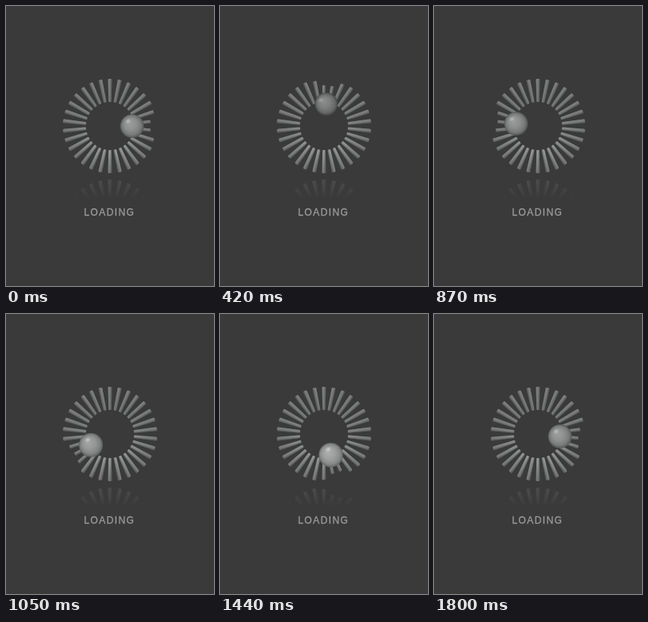
An HTML page with a canvas for the animation above (1.83 s loop, 260 px wide and 350 px high).

```html
<!DOCTYPE html>
<html lang="en">
<head>
<meta charset="utf-8">
<title>Loading</title>
<style>
  html, body { margin: 0; width: 100%; height: 100%; overflow: hidden; background: #3a3a3a; }
  canvas { display: block; width: 260px; height: 350px; }
</style>
</head>
<body>
<canvas id="stage" width="260" height="350"></canvas>
<script>
const ctx = document.getElementById('stage').getContext('2d');
const CX = 130, CY = 150, SPOKES = 30, ORBIT = 27.6;
const STEP = 30, FRAMES = 61, HOLD = 54, FLOOR = 213;
const rad = deg => deg * Math.PI / 180;
const gray = v => `rgb(${v - 1 | 0},${v + 1 | 0},${v | 0})`;

function gradient(g, stops) {
  for (const [at, color] of stops) g.addColorStop(at, color);
  return g;
}

function spokePath(inner, outer, a, b) {
  ctx.beginPath();
  ctx.moveTo(inner + 1.2, -a);
  ctx.lineTo(outer - 1.2, -b);
  ctx.quadraticCurveTo(outer, -b, outer, -b + 1.2);
  ctx.lineTo(outer, b - 1.2);
  ctx.quadraticCurveTo(outer, b, outer - 1.2, b);
  ctx.lineTo(inner + 1.2, a);
  ctx.quadraticCurveTo(inner, a, inner, a - 1);
  ctx.lineTo(inner, 1 - a);
  ctx.quadraticCurveTo(inner, -a, inner + 1.2, -a);
  ctx.closePath();
}

// Spokes close to the ball sink away from the viewer.
function spoke(deg, ballDeg) {
  const gap = Math.abs((deg - ballDeg + 540) % 360 - 180);
  const sink = Math.exp(-Math.pow(gap / 16, 4));
  const low = -Math.sin(rad(deg));
  const side = Math.cos(rad(deg)) < 0 ? -1 : 1;
  const k = 1 - 0.14 * sink;
  ctx.save();
  ctx.translate(CX, CY);
  ctx.rotate(-rad(deg));
  ctx.scale(k, k);
  spokePath(30, 59, 1.8, 2.4);
  ctx.fillStyle = gradient(ctx.createLinearGradient(30, 0, 59, 0), [
    [0, gray(134 + 20 * low)],
    [0.5, gray(126 + 7 * low)],
    [1, gray(119 - 5 * low)]
  ]);
  ctx.fill();
  ctx.clip();
  const edge = gradient(ctx.createLinearGradient(0, -2.4 * side, 0, 2.4 * side), [
    [0, 'rgba(195,198,196,.2)'],
    [0.45, 'rgba(120,122,121,0)'],
    [0.6, 'rgba(60,62,61,.1)'],
    [1, 'rgba(45,47,46,.6)']
  ]);
  ctx.fillStyle = edge;
  ctx.fillRect(29, -4, 32, 8);
  ctx.restore();
}

function ball(deg) {
  const x = CX + ORBIT * Math.cos(rad(deg));
  const y = CY - ORBIT * Math.sin(rad(deg));
  const low = (y - CY) / ORBIT;
  const r = 14.8 + 0.4 * low;
  const v = 139 + 17 * low;
  ctx.beginPath();
  ctx.arc(x, y, r, 0, 7);
  ctx.fillStyle = gradient(ctx.createRadialGradient(x - 4, y - 4, 1, x, y, r), [
    [0, gray(v + 18)],
    [0.45, gray(v + 4)],
    [0.8, gray(v - 18)],
    [1, gray(v - 54)]
  ]);
  ctx.fill();
  const hx = x - 5 + 2 * low, hy = y - 6 - low;
  ctx.beginPath();
  ctx.ellipse(hx, hy, 4.5, 2.4, -0.5, 0, 7);
  ctx.fillStyle = gradient(ctx.createRadialGradient(hx, hy, 0, hx, hy, 4.5), [
    [0, `rgba(225,228,226,${0.5 + 0.2 * low})`],
    [1, 'rgba(200,203,201,0)']
  ]);
  ctx.fill();
}

function scene(deg) {
  for (let i = 0; i < SPOKES; i++) spoke(6 + i * 360 / SPOKES, deg);
  ball(deg);
}

function reflection(deg) {
  ctx.save();
  ctx.beginPath();
  ctx.rect(0, FLOOR, 260, 32);
  ctx.clip();
  ctx.save();
  ctx.translate(0, 2 * FLOOR);
  ctx.scale(1, -1);
  scene(deg);
  ctx.restore();
  ctx.fillStyle = gradient(ctx.createLinearGradient(0, FLOOR + 3, 0, 240), [
    [0, 'rgba(58,58,58,.68)'],
    [0.5, 'rgba(58,58,58,.84)'],
    [1, 'rgba(58,58,58,1)']
  ]);
  ctx.fillRect(0, FLOOR, 260, 32);
  ctx.restore();
}

function label() {
  ctx.font = '12px "Liberation Sans", Arial, sans-serif';
  ctx.letterSpacing = '1.4px';
  ctx.fillStyle = ctx.strokeStyle = '#9b9c9b';
  ctx.lineWidth = 0.3;
  ctx.fillText('LOADING', 97.5, 262);
  ctx.strokeText('LOADING', 97.5, 262);
}

function draw(now) {
  const n = Math.floor(now / STEP) % FRAMES;
  const deg = 6 * (n < HOLD ? n : n - 1);
  ctx.fillStyle = '#3a3a3a';
  ctx.fillRect(0, 0, 260, 350);
  reflection(deg);
  scene(deg);
  label();
}

const start = performance.now();
function tick() {
  draw(performance.now() - start);
  requestAnimationFrame(tick);
}
tick();
</script>
</body>
</html>
```
